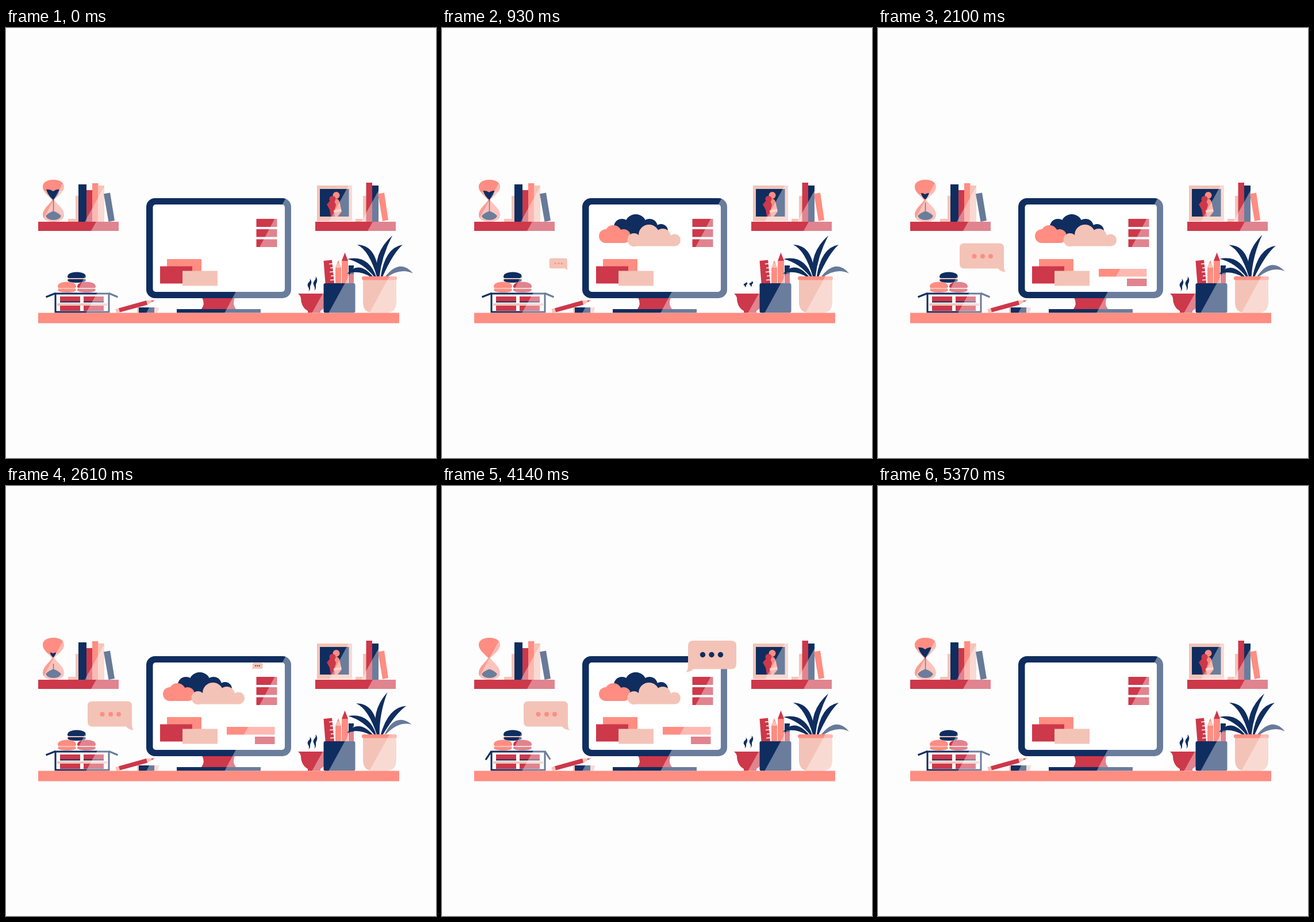
An HTML page for the animation above (5400 ms loop, 748 px wide and 748 px high).

```html
<!DOCTYPE html>
<html lang="en">
<head>
<meta charset="utf-8">
<title>Desk</title>
<style>
html, body { margin: 0; width: 100%; height: 100%; overflow: hidden; background: #fdfdfd; }
svg { display: block; width: 100vw; height: 100vh; }
.n { fill: #0f2d5f; } .r { fill: #cd384a; } .c { fill: #ff8d82; }
.p { fill: #f4c3b7; } .s { fill: #677a99; } .w { fill: #fff; }
.gloss { fill: #fff; opacity: .38; }
.line { fill: none; stroke: #0f2d5f; }
</style>
</head>
<body>
<svg viewBox="0 0 748 748">
  <defs>
    <path id="bulb" d="M82.500 264C94 264 101 269 101 276C101 286 89 293 83.500 300H80.500C76 293 64 286 64 276C64 269 71 264 82.500 264Z"/>
    <clipPath id="air"><rect id="airBox" x="60" y="260" width="45" height="23"/></clipPath>
    <g id="macaron">
      <path d="M-16 0C-17-6-10-9.500 0-9.500S17-6 16 0Q15 1 13 1H-13Q-15 1-16 0Z"/>
      <path d="M-14 3H14Q16 3 16 4.500C15 8 9 9 0 9S-15 8-16 4.500Q-16 3-14 3Z"/>
      <path class="p" d="M-15 1H15V3H-15Z"/>
    </g>
  </defs>

  <!-- left shelf -->
  <path class="r" d="M56 337H196V353H56Z"/>
  <path class="gloss" d="M157 337L148 353H197V337Z"/>
  <path class="p" d="M108 332H121V292H127V337H108Z"/>
  <path class="n" d="M126 272H140V337H126Z"/>
  <path class="r" d="M140 282H151V337H140Z"/>
  <path class="c" d="M150 270H160.500V337H150Z"/>
  <path class="p" d="M160.500 274H171V337H160.500Z"/>
  <path class="gloss" d="M174 270L137 337H174Z"/>
  <path class="s" d="M170 288.500L181 286.500L189 335L178.500 337Z"/>

  <!-- hourglass -->
  <use href="#bulb" fill="#f9aea4"/>
  <use href="#bulb" class="c" clip-path="url(#air)"/>
  <path fill="#fb9d93" d="M80.500 299H83.500C89 307 101 314 101 325C101 333 94 337 82.500 337S64 333 64 325C64 314 76 307 80.500 299Z"/>
  <path id="sand" class="n" d="M70 281Q76 280 82 284Q88 280 93 281Q91 291 83 298H81Q73 291 70 281Z"/>
  <path id="stream" class="line" stroke-width="1.500"/>
  <path class="n" d="M69 327Q74 321 82.500 318.500Q91 321 96 327Q93 334 82.500 334T69 327Z"/>
  <path class="gloss" d="M102 264L62 337H104V264Z"/>

  <!-- right shelf -->
  <path class="r" d="M538 337H678V353H538Z"/>
  <path class="gloss" d="M638 337L629 353H680V337Z"/>
  <path class="p" d="M608 332H621V292H627V337H608Z"/>
  <path class="r" d="M626.500 269H637V337H626.500Z"/>
  <path class="n" d="M637 274H648V337H637Z"/>
  <path class="gloss" d="M655 270L618 337H655Z"/>
  <path class="c" d="M647 288.500L658 286.500L665 334L655 336Z"/>
  <path class="p" d="M541 274H602V336H541Z"/>
  <path class="n" d="M546 280H596.500V328H546Z"/>
  <circle class="c" cx="574.500" cy="291" r="6"/>
  <path class="c" d="M572 297Q580 296 581 306L584 319L577 328H565L570 312Z"/>
  <circle class="r" cx="568" cy="297.500" r="5.500"/>
  <path class="r" d="M563 301Q573 300 574 308L571 318L572 328H565L563 316L558 307Z"/>
  <path class="p" d="M570 317L583 315V319L570 321Z"/>
  <path class="gloss" d="M596 274L562 336H602V274Z"/>

  <!-- monitor -->
  <path class="r" d="M341 469H398Q393 480 400 489H340Q347 480 341 469Z"/>
  <path class="n" d="M297 489H443V495.500H297Z"/>
  <rect class="n" x="244" y="296" width="252" height="174" rx="15"/>
  <rect class="w" x="255.500" y="307" width="229.500" height="152" rx="5"/>
  <path class="r" d="M435.500 332H471.500V346H435.500ZM435.500 350H471.500V363.500H435.500ZM435.500 367.500H471.500V381H435.500Z"/>
  <g id="cloudN" class="n">
    <circle cx="337" cy="343" r="19"/><circle cx="313" cy="346" r="14"/>
    <circle cx="361" cy="346" r="14"/><circle cx="381" cy="353" r="12"/>
    <path d="M310 346H384V361H310Z"/>
  </g>
  <g id="cloudC" class="c">
    <circle cx="298" cy="358" r="15"/><circle cx="285" cy="362" r="12"/><circle cx="316" cy="362" r="12"/>
    <path d="M285 362H316V374H285Z"/>
  </g>
  <g id="cloudP" class="p">
    <circle cx="360" cy="360" r="18"/><circle cx="334" cy="368.500" r="11.500"/>
    <circle cx="384" cy="363" r="14"/><circle cx="404.500" cy="369" r="10.500"/>
    <path d="M334 365H404V379.500H334Z"/>
  </g>
  <path class="c" d="M280 402H340V425H280Z"/>
  <path class="r" d="M268 414.500H324V444.500H268Z"/>
  <path class="p" d="M307 422.500H368V448.500H307Z"/>
  <rect id="bar" class="c" x="384" width="83.500"/>
  <rect id="button" class="r" x="433" width="34.500"/>
  <path class="gloss" d="M486.500 296L380 496H498V296Z"/>

  <!-- box and macarons -->
  <use href="#macaron" class="n" x="123" y="434"/>
  <use href="#macaron" class="c" x="106" y="451"/>
  <use href="#macaron" class="r" x="140" y="451"/>
  <path class="gloss" d="M141 425L123 460H158V425Z"/>
  <path class="r" d="M94 467H129V477H94ZM135 467H170V477H135ZM94 483H129V492H94ZM135 483H170V492H135Z"/>
  <path class="n" d="M94 475.500H129V477.500H94ZM135 475.500H170V477.500H135Z"/>
  <path class="p" d="M89 479H176V483H89Z"/>
  <path class="line" stroke-width="3" d="M86 462H179V494H86Z"/>
  <path id="flapL" class="line" stroke-width="3" d="M86 461.500L69.500 468"/>
  <path id="flapR" class="line" stroke-width="3" d="M179 461.500L194.500 468"/>
  <path class="gloss" d="M160 458L139 496H198V458Z"/>

  <!-- pencil and eraser -->
  <path class="p" d="M190.500 489L196 487.500L198 494.500L192 496ZM244 474L259.500 473.500L246 481.500Z"/>
  <path class="r" d="M196 487.500L244 474L246 481.500L198 494.500ZM253 474L259.500 473.500L254 477Z"/>
  <path class="p" d="M228 486H266L264 495.500H228Z"/>
  <path class="n" d="M231 486H258V495.500H231Z"/>
  <path class="gloss" d="M256 473L244 496H268V473Z"/>

  <!-- cup -->
  <g id="steam" class="n">
    <path d="M526 458C530 453 523 450 525 445C527 441 530 441 528.500 436C533 441 531 445 529.500 448C528 452 531 455 526 458Z"/>
    <path d="M536 457C540 451 533 448 535 442C537 438 540 437 538.500 432C543 437 541 442 539.500 445C538 449 541 453 536 457Z"/>
  </g>
  <path d="M555 473.500Q564 469 563 477Q561 484 551 485.500" fill="none" stroke="#f4c3b7" stroke-width="5"/>
  <path class="r" d="M508 462H561C561 478 555 488 547 492V495.500H525V492C517 488 513 479 513 470Q512 465 508 462Z"/>
  <path class="gloss" d="M551 462L532 496H553V489H566V462Z"/>

  <!-- pencil holder -->
  <path class="r" d="M552.500 405L567 403.500L571 444H555.500Z"/>
  <path d="M568 410L562 410.500M568.500 417L564 417.500M569.500 424L563 424.500M570 431L565 431.500M570.500 438L564 438.500" stroke="#fdfdfd" stroke-width="1.300"/>
  <path class="c" d="M573 444V417L578 404L583 417V444ZM584 444V405H595V444Z"/>
  <path class="p" d="M573 417L576.500 409H579.500L583 417Z"/>
  <path class="r" d="M584 405L589.500 390.500L595 405Z"/>
  <path class="n" d="M596 413H605V444H596Z"/>
  <path class="r" d="M596 428H605V444H596Z"/>
  <rect class="n" x="552.500" y="444" width="55" height="51.500" rx="3"/>
  <path class="gloss" d="M607 412L561 496H608V412Z"/>

  <!-- plant -->
  <g id="leaves"></g>
  <path class="p" d="M621 437H679V477Q679 495.500 661 495.500H639Q621 495.500 621 477Z"/>
  <rect class="c" x="619" y="432" width="61" height="6.500" rx="3"/>
  <path class="gloss" d="M667 432L632 496H682V432Z"/>

  <path class="c" d="M56 495.500H684V513.500H56Z"/>

  <!-- speech bubbles -->
  <g id="talkL">
    <path class="p" d="M150 374.500H211Q219 374.500 219 382V414Q219 421 222 425Q212 423 209 418.500H150Q142 418.500 142 410V382Q142 374.500 150 374.500Z"/>
    <g class="c"><circle cx="167.500" cy="397" r="4"/><circle cx="182" cy="397" r="4"/><circle cx="196" cy="397" r="4"/></g>
  </g>
  <g id="talkR">
    <path class="p" d="M437 269H503Q512 269 512 278V309Q512 318.500 503 318.500H437Q433 323 424.500 324Q428 320 428 312V278Q428 269 437 269Z"/>
    <g class="n"><circle cx="453.500" cy="293.500" r="4.700"/><circle cx="469" cy="293.500" r="4.700"/><circle cx="484.500" cy="293.500" r="4.700"/></g>
  </g>
</svg>
<script>
const LOOP = 5400;
const el = id => document.getElementById(id);
const set = (id, attrs) => { for (const k in attrs) el(id).setAttribute(k, attrs[k]); };

// Value of a [time, value] track at t, linear or smoothed between its points.
function track(t, points, smooth) {
  if (t <= points[0][0]) return points[0][1];
  for (let i = 1; i < points.length; i++) {
    const [t0, v0] = points[i - 1], [t1, v1] = points[i];
    if (t <= t1) {
      let k = (t - t0) / (t1 - t0);
      if (smooth) k = k * k * (3 - 2 * k);
      return v0 + (v1 - v0) * k;
    }
  }
  return points[points.length - 1][1];
}

const popTrack = (start, length) => [[start, 0], [start + length, 1], [4600, 1], [5080, 0]];

function scale(id, x, y, sx, sy = sx) {
  set(id, {
    transform: `translate(${x} ${y}) scale(${sx} ${sy}) translate(${-x} ${-y})`,
    visibility: sx > 0.005 && sy > 0.005 ? "visible" : "hidden"
  });
}

// id, origin x, origin y, start, length
const pops = [
  ["cloudN", 340, 350, 20, 600],
  ["cloudP", 367, 363, 40, 600],
  ["cloudC", 300, 361, 140, 600],
  ["talkL", 217, 418, 470, 1140],
  ["talkR", 429, 318, 2370, 1140]
];

// base x, tip x, tip y, bend x, bend y, sway in degrees, colour
const leaves = [
  [638, 593, 428, 613, 411, -2, "n"],
  [643, 594, 402, 626, 401, 2, "n"],
  [647, 611, 377, 639, 382, -2, "n"],
  [648, 672, 361, 645, 395, -7, "n"],
  [653, 690, 377, 666, 387, 7, "n"],
  [660, 708, 427, 686, 408, -12, "s"]
];
el("leaves").innerHTML = leaves.map(([b, x, y, cx, cy, , color]) => {
  const dx = x - b, dy = y - 433, d = Math.hypot(dx, dy);
  const ox = -dy / d * 8.5, oy = dx / d * 8.5;
  return `<path class="${color}" d="M${b - 1.5} 434Q${cx - ox} ${cy - oy} ${x} ${y}Q${cx + ox} ${cy + oy} ${b + 1.5} 434Z"/>`;
}).join("");
const leafPaths = [...el("leaves").children];

const swayTrack = [[1740, 0], [2550, 1], [3300, -0.5], [3750, 0]];
const calmTrack = [[1800, 0], [2600, 1], [3450, 0]];
const sandTrack = [[0, 1], [480, .95], [1740, .72], [2610, .48], [3360, .25], [4140, .06], [4500, 0], [4750, 0], [5330, 1]];
const streamTrack = [[1500, 297], [2610, 309], [3360, 314], [4140, 320], [4750, 320], [5330, 297]];
const flapTrack = [[2900, 0], [3000, -.15], [3340, 1], [4330, 1], [4650, -.1], [4850, 0]];
const steamTrack = [[0, 1], [480, .62], [660, .52], [1000, .4], [1440, .85], [1900, 1]];

function draw(t) {
  for (const [id, x, y, start, length] of pops) scale(id, x, y, track(t, popTrack(start, length)));

  const drop = track(t, [[1280, 0], [1800, 1]], true);
  const barIn = track(t, [[1500, 0], [2000, 1]], true);
  const away = 1 - track(t, [[4600, 0], [5080, 1]], true);
  set("button", { y: 410 + 26 * drop * away, height: 13 * Math.min(1, drop * 1.9) * away });
  set("bar", { y: 405 + 14 * barIn * away, height: 13.5 * barIn * away });

  const sand = track(t, sandTrack);
  scale("sand", 82, 298, sand);
  set("airBox", { height: 23 + 15 * (1 - sand) });
  set("stream", { d: `M82.500 ${track(t, streamTrack)}V320` });

  const flap = 35 * track(t, flapTrack, true);
  set("flapL", { transform: `rotate(${-flap} 86 462)` });
  set("flapR", { transform: `rotate(${flap} 179 462)` });

  scale("steam", 532, 446, 1, track(t % 2700, steamTrack, true));

  leafPaths.forEach((path, i) => {
    const angle = leaves[i][5] * track(t, i === 3 ? swayTrack : calmTrack, true);
    path.setAttribute("transform", `rotate(${angle} 648 432)`);
  });
}

const begin = performance.now();
function tick() {
  const t = (performance.now() - begin) % LOOP;
  draw(Math.floor(t / 30) * 30);
  requestAnimationFrame(tick);
}
tick();
</script>
</body>
</html>
```
